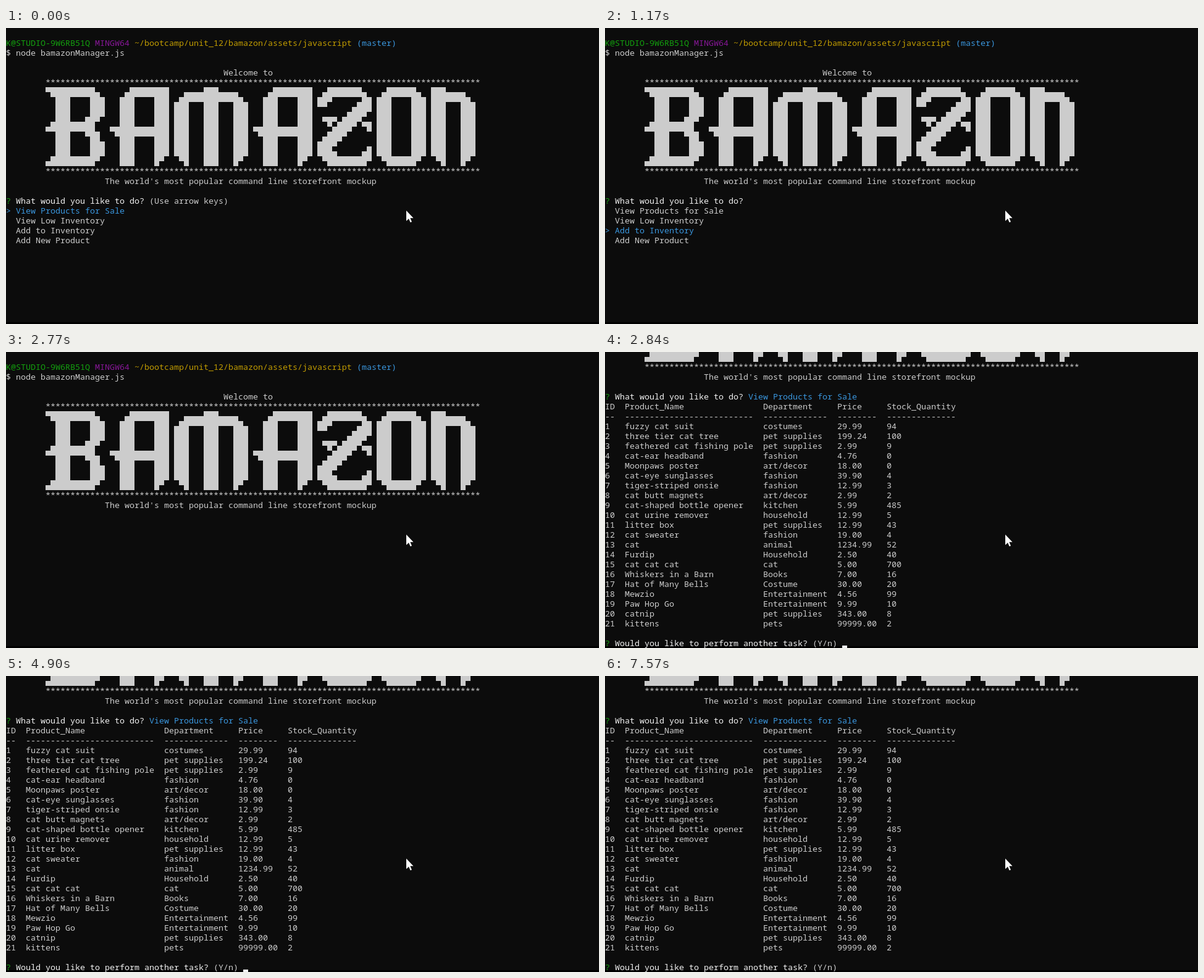
Recreate the animation shown at these times as an HTML page with a canvas. Size 960x480 px, loop 8000 ms.

```html
<!DOCTYPE html>
<html lang="en">
<head>
<meta charset="utf-8">
<title>Terminal storefront</title>
<style>
html, body { margin: 0; width: 960px; height: 480px; overflow: hidden; background: #0c0c0c; }
canvas { display: block; }
</style>
</head>
<body>
<canvas id="stage" width="960" height="480"></canvas>
<script>
const ctx = document.getElementById('stage').getContext('2d');
const LOOP = 8000, CW = 8, RH = 16;
const GREY = '#cccccc', WHITE = '#f2f2f2', GREEN = '#13a10e',
      PURPLE = '#881798', GOLD = '#c19c00', BLUE = '#3a96dd';

// Letters of the banner, eight text rows each.
const A = [
  '   ▄████████ ',
  ...Array(3).fill('  ███    ███ '),
  '▀███████████ ',
  ...Array(2).fill('  ███    ███ '),
  '  ███    █▀  '];
const B = [
  '▀█████████▄  ',
  '  ███    ███ ',
  '  ███    ███ ',
  ' ▄███▄▄▄██▀  ',
  '▀▀███▀▀▀██▄  ',
  '  ███    ██▄ ',
  '  ███    ███ ',
  '▄█████████▀  '];
const M = [
  '  ▄▄▄▄███▄▄▄▄   ',
  '▄██▀▀▀███▀▀▀██▄ ',
  ...Array(5).fill('███   ███   ███ '),
  ' ▀█   ███   █▀  '];
const Z = [
  ' ▄███████▄  ',
  '██▀     ▄██ ',
  '      ▄███▀ ',
  ' ▀█▀▄███▀▄▄ ',
  '  ▄███▀   ▀ ',
  '▄███▀       ',
  '███▄     ▄█ ',
  ' ▀████████▀ '];
const O = [
  ' ▄██████▄  ',
  ...Array(6).fill('███    ███ '),
  ' ▀██████▀  '];
const N = [
  '███▄▄▄▄   ',
  '███▀▀▀██▄ ',
  ...Array(5).fill('███   ███ '),
  ' ▀█   █▀  '];
const word = [B, A, M, A, Z, O, N];
const banner = A.map((_, i) => word.map(letter => letter[i]).join(''));

const QUESTION = 'What would you like to do?';
const options = ['View Products for Sale', 'View Low Inventory', 'Add to Inventory', 'Add New Product'];

const tableCols = [0, 4, 32, 47, 57];
const head = ['ID', 'Product_Name', 'Department', 'Price', 'Stock_Quantity'];
const rules = [2, 26, 13, 8, 14].map(n => '-'.repeat(n));
const products = `fuzzy cat suit|costumes|29.99|94
three tier cat tree|pet supplies|199.24|100
feathered cat fishing pole|pet supplies|2.99|9
cat-ear headband|fashion|4.76|0
Moonpaws poster|art/decor|18.00|0
cat-eye sunglasses|fashion|39.90|4
tiger-striped onsie|fashion|12.99|3
cat butt magnets|art/decor|2.99|2
cat-shaped bottle opener|kitchen|5.99|485
cat urine remover|household|12.99|5
litter box|pet supplies|12.99|43
cat sweater|fashion|19.00|4
cat|animal|1234.99|52
Furdip|Household|2.50|40
cat cat cat|cat|5.00|700
Whiskers in a Barn|Books|7.00|16
Hat of Many Bells|Costume|30.00|20
Mewzio|Entertainment|4.56|99
Paw Hop Go|Entertainment|9.99|10
catnip|pet supplies|343.00|8
kittens|pets|99999.00|2`.split('\n').map((line, i) => [String(i + 1), ...line.split('|')]);

// Start times of each menu choice.
const picks = [[0, 0], [500, 3], [1170, 2], [1440, 1], [1840, 0]];
const MENU_END = 2770, TABLE_START = 2840;
const BLINK_START = 3300, BLINK = 533.75;

function text(str, col, row, color = GREY) {
  ctx.fillStyle = color;
  ctx.fillText(str, col * CW, row * RH + 13);
}

function drawBanner(top) {
  ctx.fillStyle = GREY;
  banner.forEach((line, r) => [...line].forEach((ch, c) => {
    if (ch === ' ') return;
    const y = (top + r) * RH + (ch === '▄' ? RH / 2 : 0);
    ctx.fillRect((8 + c) * CW, y, CW, ch === '█' ? RH : RH / 2);
  }));
}

function drawHeader(scroll) {
  const stars = '*'.repeat(88);
  text('K@STUDIO-9W6RB51Q', 0, 1 - scroll, GREEN);
  text('MINGW64', 18, 1 - scroll, PURPLE);
  text('~/bootcamp/unit_12/bamazon/assets/javascript', 26, 1 - scroll, GOLD);
  text('(master)', 71, 1 - scroll, BLUE);
  text('$ node bamazonManager.js', 0, 2 - scroll);
  text('Welcome to', 44, 4 - scroll);
  text(stars, 8, 5 - scroll);
  drawBanner(6 - scroll);
  text(stars, 8, 14 - scroll);
  text("The world's most popular command line storefront mockup", 20, 15 - scroll);
}

function ask(question, row) {
  text('?', 0, row, GREEN);
  text(question, 2, row, WHITE);
}

function drawMenu(t) {
  const choice = picks.filter(p => p[0] <= t).pop()[1];
  ask(QUESTION, 17);
  if (t < picks[1][0]) text('(Use arrow keys)', 29, 17);
  options.forEach((label, i) => {
    const on = i === choice;
    if (on) text('>', 0, 18 + i, BLUE);
    text(label, 2, 18 + i, on ? BLUE : GREY);
  });
}

function drawTable(t) {
  ask(QUESTION, 4);
  text(options[0], 29, 4, BLUE);
  [head, rules, ...products].forEach((cells, r) =>
    cells.forEach((cell, c) => text(cell, tableCols[c], 5 + r)));
  ask('Would you like to perform another task?', 29);
  text('(Y/n)', 42, 29);
  const lit = t < BLINK_START || Math.floor((t - BLINK_START + 2) / BLINK) % 2 === 1;
  if (lit) {
    ctx.fillStyle = WHITE;
    ctx.fillRect(384, 476, 8, 4);
  }
}

function drawPointer(x, y) {
  const shape = [[0, 0], [0, 17], [4, 13.2], [6.6, 19.2], [9, 18.2], [6.4, 12.3], [11.6, 12.3]];
  ctx.beginPath();
  shape.forEach(([dx, dy]) => ctx.lineTo(x + dx, y + dy));
  ctx.closePath();
  ctx.strokeStyle = '#000';
  ctx.lineWidth = 1;
  ctx.stroke();
  ctx.fillStyle = '#fff';
  ctx.fill();
}

function draw(now) {
  const t = now % LOOP;
  ctx.fillStyle = '#0c0c0c';
  ctx.fillRect(0, 0, 960, 480);
  ctx.fillStyle = '#000';
  ctx.fillRect(0, 477, 960, 3);
  ctx.font = '13.3333px "Noto Sans Mono", "Liberation Mono", monospace';
  ctx.textBaseline = 'alphabetic';
  drawHeader(t < TABLE_START ? 0 : 13);
  if (t < MENU_END) drawMenu(t);
  else if (t >= TABLE_START) drawTable(t);
  drawPointer(648, 296);
  requestAnimationFrame(draw);
}
requestAnimationFrame(draw);
</script>
</body>
</html>
```
